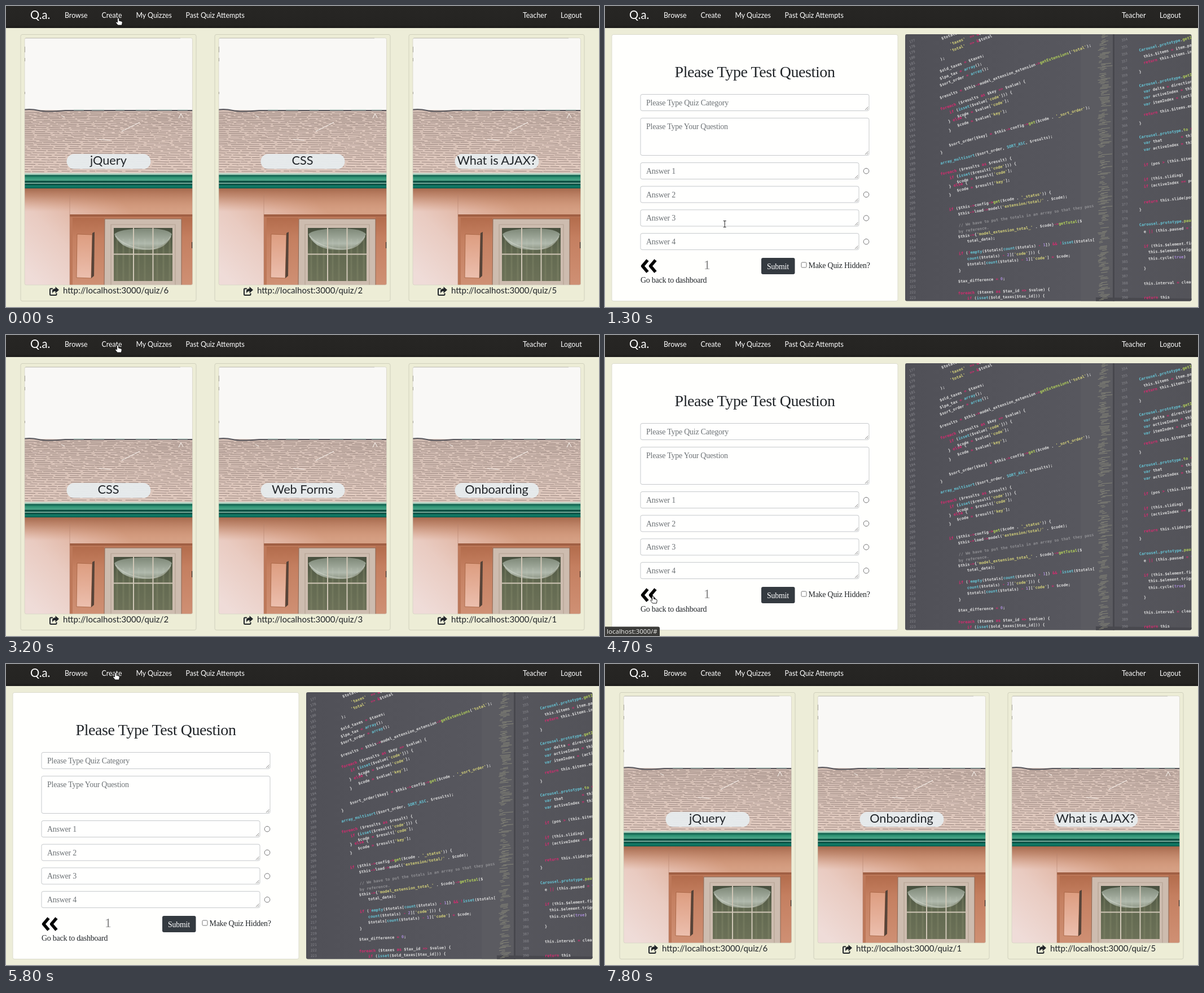
An HTML page for the animation above (8.3 s loop, 1051 by 533 pixels).

```html
<!DOCTYPE html>
<html lang="en">
<head>
<meta charset="utf-8">
<title>Quiz app walkthrough</title>
<style>
  html, body { margin: 0; width: 100%; height: 100%; overflow: hidden; background: #ededd8; }
  svg { display: block; width: 100%; height: 100%; }
  text { white-space: pre; }
  .lato { font-family: Lato, sans-serif; }
  .serif { font-family: "Liberation Serif", serif; font-size: 13.9px; letter-spacing: -.015em; fill: #212529; }
  .heading { font-size: 28px; text-anchor: middle; }
  .count { font-size: 23.5px; fill: #858585; }
  .white { fill: #fff; }
  .hint { fill: #6d7276; }
  .brand { font-size: 20.3px; fill: #fff; }
  .nav { font-size: 12.4px; fill: #fff; }
  .title { font-size: 21.7px; fill: #212529; text-anchor: middle; }
  .url { font-size: 15px; fill: #212529; }
  .field { fill: #fffffe; stroke: #c6c9cc; }
  .code { font: bold 6.95px "DejaVu Sans Mono", monospace; fill: #dcdcdc; }
  .num { font: 6px "DejaVu Sans Mono", monospace; fill: #8b8b91; }
  .status { font: 11.5px "Noto Sans", sans-serif; fill: #e8e8e6; }
</style>
</head>
<body>
<svg viewBox="0 0 1051 533" preserveAspectRatio="none">
  <defs>
    <linearGradient id="gutter" x2="0" y2="1">
      <stop offset="0" stop-color="#c9d8cc"/><stop offset=".1" stop-color="#a9d3c0"/>
      <stop offset=".16" stop-color="#0c5a49"/><stop offset=".3" stop-color="#2f9475"/>
      <stop offset=".48" stop-color="#4ba588"/><stop offset=".54" stop-color="#0b4a3e"/>
      <stop offset=".62" stop-color="#0d5547"/><stop offset=".66" stop-color="#a5d2c2"/>
      <stop offset=".72" stop-color="#08443a"/><stop offset=".86" stop-color="#11806a"/>
      <stop offset="1" stop-color="#0a5a4c"/>
    </linearGradient>
    <linearGradient id="wall" gradientUnits="userSpaceOnUse" x1="45" y1="480" x2="190" y2="330">
      <stop offset="0" stop-color="#efdcd8"/><stop offset=".4" stop-color="#e9cbc1"/>
      <stop offset=".75" stop-color="#dfb19d"/><stop offset="1" stop-color="#d59f83"/>
    </linearGradient>
    <linearGradient id="eave" x2="0" y2="1">
      <stop offset="0" stop-color="#a3664a"/><stop offset=".35" stop-color="#b67a5d" stop-opacity=".75"/>
      <stop offset="1" stop-color="#d09273" stop-opacity="0"/>
    </linearGradient>
    <linearGradient id="roof" x2="0" y2="1">
      <stop offset="0" stop-color="#cfbab0"/><stop offset="1" stop-color="#dfc8bd"/>
    </linearGradient>
    <linearGradient id="panel" x2="0" y2="1">
      <stop offset="0" stop-color="#dd9d80"/><stop offset="1" stop-color="#ecbfae"/>
    </linearGradient>
    <linearGradient id="niche" x2="0" y2="1">
      <stop offset="0" stop-color="#b36c4c"/><stop offset=".3" stop-color="#c47f60"/><stop offset="1" stop-color="#cf9074"/>
    </linearGradient>
    <linearGradient id="pane" x2="0" y2="1">
      <stop offset="0" stop-color="#48503f"/><stop offset=".5" stop-color="#636a51"/><stop offset="1" stop-color="#6c7158"/>
    </linearGradient>
    <linearGradient id="sheen" x2="0" y2="1">
      <stop offset="0" stop-color="#a9b5a6" stop-opacity=".55"/><stop offset=".7" stop-color="#c6cfc5" stop-opacity=".8"/>
      <stop offset="1" stop-color="#c6cfc5" stop-opacity=".45"/>
    </linearGradient>
    <linearGradient id="screen" x2="1" y2="0">
      <stop offset="0" stop-color="#505057"/><stop offset=".6" stop-color="#57575e"/>
      <stop offset="1" stop-color="#535359"/>
    </linearGradient>
    <linearGradient id="bar" x2="0" y2="1">
      <stop offset="0" stop-color="#272624"/><stop offset=".85" stop-color="#252422"/><stop offset="1" stop-color="#1d1c1b"/>
    </linearGradient>
    <clipPath id="photoClip"><rect x="33" y="56.5" width="297.5" height="437.5" rx="3"/></clipPath>
    <clipPath id="screenClip"><rect x="532" y="50" width="507.5" height="472.5" rx="3"/></clipPath>

    <g id="house" clip-path="url(#photoClip)">
      <path fill="#f9f8f6" d="M33 56h298v130H33z"/>
      <path fill="none" stroke="#77736c" d="M33 56.7H309M33.3 72v10M33.3 92v6M33.3 152v4"/>
      <path fill="url(#roof)" d="M33 184L331 186V297H33z"/>
      <g id="shingles"></g>
      <path fill="none" stroke="#55545a" stroke-width="2" d="M33 183.5Q45 182 58 185T105 185H331"/>
      <path fill="none" stroke="#b9cbc3" stroke-width="1.3" d="M120 184h18m14 0h22m20 0h16m20 0h24m14 0h26m10 0h18"/>
      <path fill="none" stroke="#f3ece6" stroke-width="1.2" d="M98 194l6 3M165 236l20 2M205 222l32-16M306 199l4-8 4 7"/>
      <path fill="url(#wall)" d="M33 322h298v173H33z"/>
      <path fill="url(#eave)" d="M33 322h298v42H33z"/>
      <path fill="#bd7859" d="M113 369H331V495H113z"/>
      <path fill="#a05f43" d="M113 369H331V373H113z"/>
      <path fill="url(#niche)" d="M118 375H174V495H118z"/>
      <path fill="none" stroke="#b58470" d="M113 335V495" opacity=".6"/>
      <path fill="url(#niche)" d="M311 374h20v121h-20z"/>
      <path fill="url(#panel)" stroke="#a3603f" stroke-width=".8" d="M126 404L153 405 151 482 125 481z"/>
      <path fill="#574439" d="M153 402L157 400 156 478 151 482z"/>
      <path fill="#cdbcaf" stroke="#8c6652" d="M175 377H311V496H174z"/>
      <path fill="none" stroke="#b6a394" stroke-width="1.2" d="M186 495V387H300V495"/>
      <path fill="url(#pane)" d="M191 393h104v94H191z"/>
      <path fill="none" stroke="#83886a" stroke-width="3" d="M197 412V487M208 412V487M219 412V487M235 412V487M246 412V487M268 412V487M279 412V487M290 412V487" opacity=".4"/>
      <path fill="url(#sheen)" d="M192 404Q200 395 243 394T294 404Q288 420 264 430Q228 436 207 423Q195 414 192 404z"/>
      <path fill="none" stroke="#d5d9cf" stroke-width="2" d="M194 407Q208 425 243 430T292 408" opacity=".5"/>
      <path fill="none" stroke="#cfc6b6" stroke-width="2" d="M226 393V487M260.5 393V487M191 439.5H295"/>
      <path fill="#3c3029" d="M329 418h2v11h-2z"/>
      <path fill="url(#gutter)" d="M33 295.5H331V323H33z"/>
    </g>

    <g id="share" fill="#212529">
      <path fill="none" stroke="#212529" stroke-width="2" stroke-linejoin="round" d="M83 500.5H79.5Q78 500.5 78 502V510.5Q78 512 79.5 512H88Q89.5 512 89.5 510.5V508.5"/>
      <path d="M87.5 497L94 502.7 87.5 508.4V505Q83.5 504.8 82.5 509Q79.8 500.7 87.5 500.3z"/>
    </g>
  </defs>

  <rect width="1051" height="533" fill="#ededd8"/>
  <rect width="1051" height="39" fill="url(#bar)"/>
  <g id="links" class="lato"></g>
  <g id="dash" class="lato"></g>
  <g id="form">
    <rect x="12" y="50.5" width="507" height="472" rx="3" fill="#fffffd" stroke="#dcdccd"/>
    <path fill="none" stroke="#000" stroke-width="5.6" stroke-linejoin="round" d="M75.5 450L66.5 460.5 75.5 471M89.5 450L80.5 460.5 89.5 471"/>
    <rect x="277" y="446" width="59.5" height="29" rx="3" fill="#343a40"/>
    <rect x="348" y="454" width="9" height="9" rx="1.5" fill="#fff" stroke="#767676"/>
    <g id="fields"></g>
  </g>
  <g id="shot" clip-path="url(#screenClip)">
    <rect x="532" y="50" width="508" height="473" fill="url(#screen)"/>
    <path fill="#5f5f65" d="M843 50h57v473h-57z" opacity=".55"/>
    <path fill="#47474d" d="M900 50h3v473h-3z"/>
    <path fill="#48484e" d="M870 516L1040 518V523H870z"/>
    <g id="code"></g>
  </g>
  <g id="status"><rect id="bubble" x="-4" y="516.5" height="20" rx="3" fill="#3b3b39"/><text class="status" x="3" y="529">localhost:3000/#</text></g>
  <g id="cursor" stroke-linejoin="round">
    <path id="hand" fill="#fff" stroke="#111" stroke-width=".9" d="M-1.4 1.2Q0 -.9 1.4 1.2V5L6 6.2Q7.4 6.6 7.2 8.4L6.4 13H-.6L-4.2 8.6Q-4.2 6.4 -2.2 7.4L-1.4 8.2z"/>
    <g id="beam" fill="none"><path stroke="#fff" stroke-width="2.6" d="M-2.5 -5.5H2.5M0 -5.5V5.5M-2.5 5.5H2.5"/><path stroke="#222" d="M-2.5 -5.5H2.5M0 -5.5V5.5M-2.5 5.5H2.5"/></g>
    <path id="arrow" fill="#111" stroke="#fff" stroke-width=".9" d="M0 0V12L2.8 9.6 4.7 13.8 6.7 12.9 4.9 8.8H8.8z"/>
  </g>
</svg>
<script>
const LOOP = 8300, CARD_STEP = 344;
const $ = id => document.getElementById(id);
const esc = s => s.replace(/&/g, "&amp;").replace(/</g, "&lt;").replace(/>/g, "&gt;");
const label = (x, y, s, cls) => `<text class="${cls}" x="${x}" y="${y}">${esc(s)}</text>`;
const show = (el, on) => { el.style.display = on ? "" : "none"; };

let seed = 7;
const rnd = () => (seed = seed * 16807 % 2147483647) / 2147483647;

// Navigation
$("links").innerHTML = label(43, 23, "Q.a.", "brand") +
  [[104, "Browse"], [169.5, "Create"], [230.5, "My Quizzes"], [318.5, "Past Quiz Attempts"],
   [916, "Teacher"], [983, "Logout"]].map(([x, s]) => label(x, 21, s, "nav")).join("");

// Roof: rows of broken dark lines that widen towards the eave
function shingles() {
  let dark = "", light = "";
  for (let y = 188.5; y < 295; y += 2.8 + (y - 188) / 70) {
    for (let x = 33 - rnd() * 10; x < 331;) {
      const w = 10 + rnd() * 18, dy = Math.sin(x / 45 + y / 9) * .6;
      dark += `M${x.toFixed(1)} ${(y + dy).toFixed(1)}l${w.toFixed(1)} ${(rnd() - .3).toFixed(1)}`;
      if (rnd() < .35) light += `M${x.toFixed(1)} ${(y + 1.7).toFixed(1)}h${(w * .7).toFixed(1)}`;
      x += w + 1 + rnd() * 5;
    }
  }
  return `<path fill="none" stroke="#6a5855" stroke-width=".95" opacity=".6" d="${dark}"/>` +
         `<path fill="none" stroke="#ecd5ca" stroke-width="1.1" opacity=".7" d="${light}"/>`;
}
$("shingles").innerHTML = shingles();

// Quiz cards
$("dash").innerHTML = [0, 1, 2].map(i => `<g transform="translate(${i * CARD_STEP})">
  <rect x="26" y="50.5" width="311" height="472" rx="3" fill="#ededd6" stroke="#d0d0bd"/>
  <use href="#house"/><rect x="33" y="56.5" width="297.5" height="437.5" rx="3" fill="none" stroke="#d2d0c2" stroke-width=".7"/>
  <rect x="107.5" y="262" width="149" height="26.5" rx="13.2" fill="#e7edef" opacity=".95"/>
  <text class="title" x="181.5" y="281"></text><use href="#share"/><text class="url" x="101" y="509"></text></g>`).join("");
const titles = document.querySelectorAll(".title"), urls = document.querySelectorAll(".url");

// Form
const boxes = [[156.5, 29, 405, "Please Type Quiz Category"], [198.5, 66, 405, "Please Type Your Question"]];
for (let i = 0; i < 4; i++) boxes.push([277.5 + i * 41.7, 29, 387, "Answer " + (i + 1)]);
$("fields").innerHTML = boxes.map(([y, h, w, s], i) => {
  const r = 63 + w, b = y + h;
  return `<rect class="field" x="63" y="${y}" width="${w}" height="${h}" rx="3"/>` +
    `<path stroke="#777" stroke-width=".9" d="M${r - 7} ${b - 1.5}l5.5-5.5M${r - 4} ${b - 1.5}l2.5-2.5"/>` +
    label(73, y + 19.5, s, "serif hint") +
    (i > 1 ? `<circle cx="463" cy="${y + 14.7}" r="4.8" fill="#fff" stroke="#767676"/>` : "");
}).join("") +
  label(265.5, 126, "Please Type Test Question", "serif heading") + label(175, 466, "1", "serif count") +
  label(63, 490, "Go back to dashboard", "serif") + label(360.5, 464, "Make Quiz Hidden?", "serif") +
  label(287, 465.5, "Submit", "serif white");

// Tilted editor screen
const left = [
  [597, 60, "$totals = array("], [612, 70, "'taxes'  => &$taxes,"], [612, 82, "'total'  => &$total"], [595, 97, ");"],
  [594, 118, "$old_taxes = $taxes;"], [594, 131, "$lpa_tax = array();"], [594, 143, "$sort_order = array();"],
  [594, 165, "$results = $this->model_extension_extension->getExtensions('total');"],
  [595, 185, "foreach ($results as $key => $value) {"], [611, 191, "if (isset($value['code'])) {"],
  [625, 198, "$code = $value['code'];"], [609, 207, "} else {"], [625, 214, "$code = $value['key'];"], [610, 223, "}"],
  [610, 249, "$sort_order[$key] = $this->config->get($code . '_sort_order');"], [595, 262, "}"],
  [595, 281, "array_multisort($sort_order, SORT_ASC, $results);"],
  [595, 300, "foreach ($results as $result) {"], [611, 307, "if (isset($result['code'])) {"],
  [624, 314, "$code = $result['code'];"], [610, 322, "} else {"], [624, 329, "$code = $result['key'];"], [610, 337, "}"],
  [610, 363, "if ($this->config->get($code . '_status')) {"],
  [626, 371, "$this->load->model('extension/total/' . $code);"],
  [627, 391, "// We have to put the totals in an array so that they pass"], [627, 402, "by reference."],
  [626, 411, "$this->{'model_extension_total_' . $code}->getTotal($"], [642, 419, "total_data);"],
  [627, 441, "if (!empty($totals[count($totals) - 1]) && !isset($totals["],
  [642, 450, "count($totals) - 2]['code'])) {"], [642, 460, "$totals[count($totals) - 1]['code'] = $code;"], [627, 471, "}"],
  [626, 490, "$tax_difference = 0;"], [626, 511, "foreach ($taxes as $tax_id => $value) {"], [642, 520, "if (isset($old_taxes[$tax_id])) {"]
];
const right = [
  [947, 81, "Carousel.prototype.getItem"], [955, 92, "this.$items = item.parent"], [955, 103, "return this.$items.index"], [947, 119, "}"],
  [947, 144, "Carousel.prototype.getItem"], [955, 154, "var delta = direction =="], [955, 165, "var activeIndex = this."],
  [955, 177, "var itemIndex = (active"], [955, 195, "return this.$items.eq("], [947, 210, "}"],
  [947, 235, "Carousel.prototype.to = fu"], [955, 245, "var that        = this"], [955, 257, "var activeIndex = this."],
  [955, 284, "if (pos > (this.$items."], [955, 310, "if (this.sliding)"], [955, 322, "if (activeIndex == pos)"],
  [955, 350, "return this.slide(pos >"], [947, 363, "}"], [947, 390, "Carousel.prototype.pause ="],
  [955, 402, "e || (this.paused = true"], [955, 428, "if (this.$element.find("], [963, 438, "this.$element.trigger"],
  [963, 450, "this.cycle(true)"], [955, 467, "}"], [955, 494, "this.interval = clearI"], [955, 519, "return this"]
];
const palette = [
  [/^(\/\/|by ref)/, "#8f8f93"], [/^'/, "#d6d37a"], [/^(foreach|if|else|as|return)$|^[-=!&|>]+$/, "#d92a70"],
  [/^(array\w*|count|empty|isset|SORT_ASC|var|Carousel|prototype)$/, "#66c5d6"],
  [/^(get\w*|to|pause)$/, "#b5d35a"], [/^(\d+|true)$/, "#a98ad8"]
];
const paint = s => s.split(/('[^']*'?|\/\/.*|by reference\.|\w+|[-=!&|>]+)/).map(p => {
  const hit = palette.find(([re]) => re.test(p));
  return hit ? `<tspan fill="${hit[1]}">${esc(p)}</tspan>` : esc(p);
}).join("");
const tilt = (x, y, angle) => `transform="translate(${x} ${y}) rotate(${-angle(y)})"`;
const tilted = (rows, angle) => rows.map(([x, y, s]) =>
  `<text class="code" ${tilt(x, y, angle)}>${paint(s)}</text>`).join("");
const numbers = (x, first, count, y, step, angle) => Array.from({ length: count }, (_, i) =>
  `<text class="num" ${tilt(x, y + i * step, angle)}>${first + i}</text>`).join("");
const leftTilt = y => Math.min(20, 20 - (y - 150) * .0485), rightTilt = y => 14 - (y - 81) * .029;

function minimap() {
  let d = "";
  for (let y = 50; y < 522; y += 2.2) {
    if (rnd() < .2) continue;
    const x = 873 + rnd() * 9;
    d += `M${x.toFixed(1)} ${y.toFixed(1)}l${(5 + rnd() * 14).toFixed(1)} -1.5`;
  }
  return `<path fill="none" stroke="#aaa98c" opacity=".55" d="${d}"/>`;
}
$("code").innerHTML = minimap() + tilted(left, leftTilt) + tilted(right, rightTilt) +
  numbers(540, 177, 47, 66, 9.85, leftTilt) + numbers(916, 354, 37, 63, 12.65, rightTilt);

// Timeline
const quiz = { jQuery: 6, CSS: 2, "What is AJAX?": 5, "Web Forms": 3, Onboarding: 1 };
const scenes = [
  [0, ["jQuery", "CSS", "What is AJAX?"]], [600, "form"], [800, "full"],
  [2700, ["CSS", "Web Forms", "Onboarding"]], [3300, "full"],
  [5200, ["Web Forms", "jQuery", "Onboarding"]], [5800, "full"],
  [7500, ["jQuery", "Onboarding", "What is AJAX?"]]
];
// time, width, opacity
const bubble = [[0, 0], [1700, 97, .9], [2000, 97, 1], [2400, 348, 1], [2700, 0], [4600, 97, 1], [4900, 348, 1],
  [5200, 0], [6800, 97, 1], [7100, 348, 1], [7500, 0]];
const path = [
  [0, 199, 21], [300, 199, 21], [400, 198, 19], [700, 198, 19], [1100, 244, 367], [1200, 244, 367],
  [1700, 85, 462], [2300, 85, 462], [2500, 112, 408], [3000, 198, 19], [3100, 198, 19], [3200, 198, 18],
  [3400, 198, 18], [3800, 201, 337], [3900, 201, 337], [4700, 85, 462], [4800, 85, 462], [5500, 196, 27],
  [5600, 196, 27], [5700, 194, 15], [5900, 194, 15], [6300, 95, 422], [6400, 95, 422], [6800, 85, 462],
  [7000, 85, 462], [7600, 196, 15], [LOOP, 196, 15]
];
const at = (list, t) => list.filter(k => k[0] <= t).pop();

function place(t) {
  const i = path.findIndex(k => k[0] > t), [t0, x0, y0] = path[i - 1], [t1, x1, y1] = path[i];
  const p = (t - t0) / (t1 - t0);
  return [x0 + (x1 - x0) * p, y0 + (y1 - y0) * p];
}
const within = (x, y, l, t, w, h) => x >= l && x <= l + w && y >= t && y <= t + h;

function pointer(x, y, onForm) {
  if (within(x, y, 104, 4, 320, 29)) return "hand";
  if (!onForm) return "arrow";
  if (within(x, y, 63, 448, 30, 25) || within(x, y, 63, 478, 118, 14)) return "hand";
  return boxes.some(([t, h, w]) => within(x, y, 63, t, w, h)) ? "beam" : "arrow";
}

let current;
function draw(time) {
  const t = Math.floor(time / 100) * 100;
  const scene = at(scenes, t)[1], onForm = typeof scene === "string";
  if (scene !== current) {
    current = scene;
    show($("dash"), !onForm);
    show($("form"), onForm);
    show($("shot"), scene === "full");
    if (!onForm) scene.forEach((name, i) => {
      titles[i].textContent = name;
      urls[i].textContent = "http://localhost:3000/quiz/" + quiz[name];
    });
  }
  const [, width, alpha] = at(bubble, t);
  show($("status"), width > 0);
  $("bubble").setAttribute("width", width + 4);
  $("status").setAttribute("opacity", alpha || 0);

  const [x, y] = place(t), kind = pointer(x, y, onForm);
  show($("cursor"), t < 7800);
  $("cursor").setAttribute("transform", `translate(${x} ${y})`);
  for (const k of ["hand", "beam", "arrow"]) show($(k), k === kind);
}

const start = performance.now();
function tick() {
  draw((performance.now() - start) % LOOP);
  requestAnimationFrame(tick);
}
tick();
</script>
</body>
</html>
```
